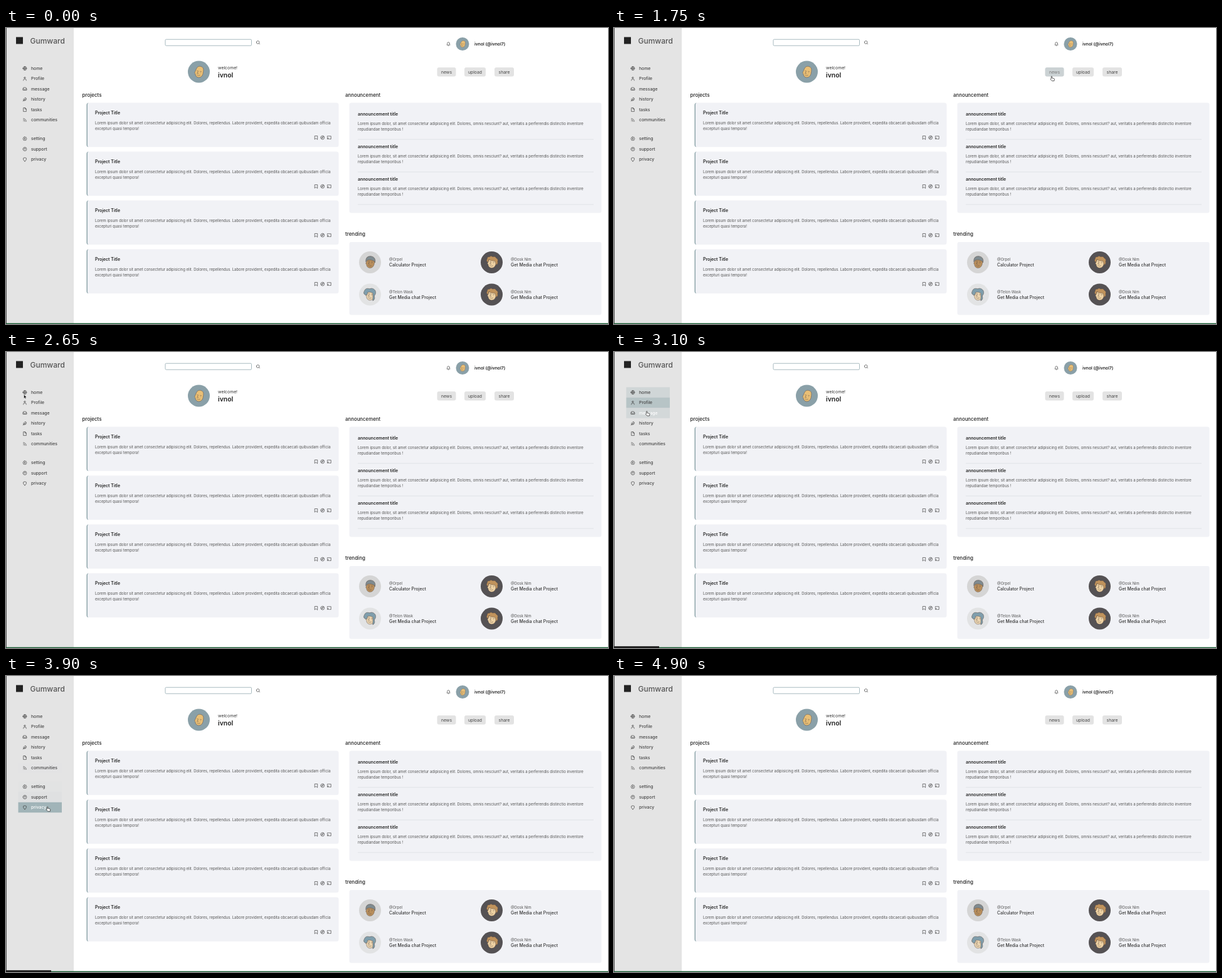
Recreate the animation shown at these times as an HTML page. Size 960 by 473 pixels, loop 5.35 s.

```html
<!DOCTYPE html>
<html lang="en">
<head>
<meta charset="utf-8">
<title>Dashboard</title>
<style>
  html, body { margin: 0; width: 100%; height: 100%; overflow: hidden; background: #fff; }
  svg { display: block; width: 960px; height: 473px; }
  text { font-family: Inter, "Noto Sans", sans-serif; white-space: pre; }
  .icon { fill: none; stroke: #3c3c3c; stroke-width: 2.3; stroke-linecap: round; stroke-linejoin: round; }
  .line { fill: none; stroke: #5a4a42; stroke-width: .45; stroke-linecap: round; stroke-linejoin: round; }
</style>
</head>
<body>
<svg id="stage" viewBox="0 0 960 473"></svg>
<script>
const LOOP = 5350, FADE = 300, ACCENT = '#8fa7ac', CARD = '#f1f2f6';

// Icons on a 24 unit grid
const ICONS = {
  globe: 'M2 12a10 10 0 1 0 20 0a10 10 0 1 0-20 0ZM2 12H22M12 2q-8 10 0 20q8-10 0-20',
  user: 'M20 22v-2a5 5 0 0 0-5-5H9a5 5 0 0 0-5 5v2M8 7a4 4 0 1 0 8 0a4 4 0 1 0-8 0',
  inbox: 'M22 12H16l-2 3h-4l-2-3H2M6 4H18l4 8v7H2v-7Z',
  feather: 'M20 12a6 6 0 0 0-8-8L5 11v8h8ZM16 8L2 22M17 15H9',
  file: 'M13 2H4V22H20V9ZM13 2V9H20',
  rss: 'M4 11a9 9 0 0 1 9 9M4 4a16 16 0 0 1 16 16M5 19h.1',
  gear: 'M12 1l3 3 4-.5.5 4L23 12l-3.5 4-.5 4-4-.5-3 3-3-3-4 .5-.5-4L1 12l3.5-4 .5-4 4 .5ZM9 12a3 3 0 1 0 6 0a3 3 0 1 0-6 0',
  help: 'M2 12a10 10 0 1 0 20 0a10 10 0 1 0-20 0M9 9a3 3 0 0 1 6 1q0 2-3 3M12 17h.1',
  shield: 'M12 22q8-4 8-10V5l-8-3-8 3v7q0 6 8 10Z',
  bookmark: 'M19 22l-7-6-7 6V3H19Z',
  compass: 'M2 12a10 10 0 1 0 20 0a10 10 0 1 0-20 0M16 8l-2 6-6 2 2-6Z',
  cast: 'M2 8V4H22V20H14M2 12a8 8 0 0 1 8 8M2 16a4 4 0 0 1 4 4M2 20h.1',
  search: 'M3 11a8 8 0 1 0 16 0a8 8 0 1 0-16 0M21 21l-4-4',
  bell: 'M18 8A6 6 0 0 0 6 8c0 7-3 9-3 9H21s-3-2-3-9M10 21h4'
};

const rect = (x, y, w, h, fill, rx = 0, more = '') =>
  `<rect x="${x}" y="${y}" width="${w}" height="${h}" rx="${rx}" fill="${fill}" ${more}/>`;
const text = (s, x, y, size, weight = 400, fill = '#555', more = '') =>
  `<text x="${x}" y="${y}" font-size="${size}" font-weight="${weight}" fill="${fill}" ${more}>${s}</text>`;
const icon = (name, x, y, size = 7) =>
  `<path class="icon" d="${ICONS[name]}" transform="translate(${x - size / 2} ${y - size / 2}) scale(${size / 24})"/>`;

// Cartoon heads on a disc of radius 17.5
const HAIR = {
  bald: '',
  short: 'M-7 0Q-9-9 0-10Q8-10 8-1L6-3Q1-5-4-3Z',
  long: 'M-5 2Q-12 2-10-4Q-9-10-2-9Q2-12 7-8Q10-4 7 1Q10 6 6 9L5 2 4-3Q0-5-4-3Z',
  curly: 'M-6 1Q-10-1-8-4Q-9-8-5-8Q-3-11 0-9Q4-11 6-8Q10-7 9-3Q11 0 8 3L6-1Q5-4 2-3Q-2-2-5-4Z'
};
function avatar(x, y, r, bg, skin, style, hair) {
  return `<g transform="translate(${x} ${y}) scale(${r / 17.5})"><circle r="17.5" fill="${bg}"/>
    <g transform="rotate(10)"><path class="line" d="M-5-3Q-4-9 1-9Q7-9 7-2Q8 8 1 9Q-4 9-5 4Q-7 4-6 1Z" style="fill:${skin}"/>
    <path class="line" d="${HAIR[style]}" style="fill:${hair}"/>
    <path class="line" d="M-3-1h2M2-1h2M-1 0L-2.500 3H0M-2 5.500Q0 7 3 5M-2 1h.1M3 1h.1"/></g></g>`;
}

const MENU = [
  ['home', 'globe', 64.5], ['Profile', 'user', 81], ['message', 'inbox', 97.5],
  ['history', 'feather', 114], ['tasks', 'file', 130.5], ['communities', 'rss', 147],
  ['setting', 'gear', 177], ['support', 'help', 193.5], ['privacy', 'shield', 210]
];
const BUTTONS = [['news', 687.5, 30], ['upload', 731, 34], ['share', 779, 31]];

function sidebar() {
  return rect(0, 0, 108, 473, '#e4e4e4') + rect(0, 0, .8, 473, '#333') +
    rect(16, 14.5, 11, 11, '#222') + text('Gumward', 38.5, 24.5, 12, 500) +
    MENU.map(([name, ic, y]) => rect(19.5, y - 8.25, 69.5, 16.5, ACCENT, 0, `id="bg-${name}" opacity="0"`) +
      icon(ic, 30, y) + text(name, 40, y + 2.4, 6.85, 500, '#444', `id="tx-${name}"`)).join('');
}

function header() {
  return rect(254, 18.2, 137.5, 10, '#fff', 1.5, 'stroke="#9db3b8" stroke-width=".9"') +
    icon('search', 402, 23.2) + icon('bell', 705.5, 25.6) +
    avatar(728, 25.5, 10.5, '#8aa0a8', '#e9bf76', 'bald') +
    text('ivnol (@ivnol7)', 747, 28, 6.8, 600, '#222') +
    avatar(307.5, 70, 17.5, '#8aa0a8', '#e9bf76', 'bald') +
    text('welcome!', 338, 65.5, 6.85, 400, '#333') + text('ivnol', 338, 79, 10.4, 600, '#222') +
    BUTTONS.map(([name, x, w]) => rect(x, 63, w, 14.5, '#e3e3e3', 3) +
      rect(x, 63, w, 14.5, ACCENT, 3, `id="bg-${name}" opacity="0"`) +
      text(name, x + w / 2, 72.6, 6.8, 400, '#444', `id="tx-${name}" text-anchor="middle"`)).join('');
}

function projects() {
  let out = text('projects', 121.5, 109.5, 8, 500, '#222');
  for (let i = 0; i < 4; i++) {
    const y = 119.5 + i * 78;
    out += rect(128.5, y, 402, 70.8, CARD, 3.5) +
      `<path fill="${ACCENT}" d="M132 ${y}q-3.5 0-3.5 3.5v63.8q0 3.5 3.5 3.5q-2 0-2-3.5v-63.8q0-3.5 2-3.5Z"/>` +
      text('Project Title', 142, y + 18.8, 6.9, 600, '#222') +
      text('Lorem ipsum dolor sit amet consectetur adipisicing elit. Dolores, repellendus. Labore provident, expedita obcaecati quibusdam officia', 142, y + 34, 5.97) +
      text('excepturi quasi tempora!', 142, y + 43, 5.97) +
      ['bookmark', 'compass', 'cast'].map((n, k) => icon(n, 494.3 + k * 10.5, y + 55.6)).join('');
  }
  return out;
}

function announcements() {
  let out = text('announcement', 541, 109.5, 7.85, 500, '#222') + rect(547.5, 119.5, 402, 176, CARD, 3);
  for (let i = 0; i < 3; i++) {
    const y = 140.4 + i * 52;
    out += text('announcement title', 561, y, 6.87, 600, '#222') +
      text('Lorem ipsum dolor, sit amet consectetur adipisicing elit. Dolores, omnis nesciunt? aut, veritatis a perferendis distinctio inventore', 561, y + 14.9, 5.97) +
      text('repudiandae temporibus !', 561, y + 23.8, 5.97) +
      rect(561, y + 37.2, 376, .8, '#d9dce1');
  }
  return out;
}

function trending() {
  const chat = 'Get Media chat Project', dark = ['#555254', '#efd3a4', 'curly', '#c0935c'];
  const people = [
    [580.5, 374.5, '@Orpel', 'Calculator Project', ['#d5d5d5', '#b98f5c', 'short', '#7f8b90']],
    [774.5, 374.5, '@Dosk Nim', chat, dark],
    [580.5, 426, '@Telon Wask', chat, ['#e2e3e4', '#ecd6b2', 'long', '#7f9eac']],
    [774.5, 426, '@Dosk Nim', chat, dark]
  ];
  return text('trending', 541, 332.3, 8, 500, '#222') + rect(547.5, 342, 402, 116.5, CARD, 3) +
    people.map(([x, y, who, what, look]) => avatar(x, y, 17.5, ...look) +
      text(who, x + 30.5, y - 2.5, 5.95) + text(what, x + 30.5, y + 6.8, 6.92, 500, '#333')).join('');
}

document.getElementById('stage').innerHTML =
  sidebar() + header() + projects() + announcements() + trending() +
  rect(0, 471.7, 960, 1.3, '#145a30') + rect(0, 470.2, 72, 2.8, '#1c1c1c', 0, 'id="status" opacity="0"') +
  `<g id="cursor">
    <path id="arrow" d="M0 0V6.2L1.4 4.9 2.3 7 3.3 6.5 2.4 4.5H4.4Z" fill="#111" stroke="#fff" stroke-width=".4"/>
    <path id="hand" transform="translate(-2.3 0)" d="M1.6 4.2V.9a.7.7 0 0 1 1.4 0V3l3 .7q1 .3.9 1.4L6.4 7.6H2.8L.6 5.2q0-1 1-1Z" fill="#fff" stroke="#222" stroke-width=".7"/>
  </g>`;

// Pointer path: time, x, y
const PATH = [
  [100, 420, 90], [250, 300, 22], [350, 300, 22], [600, 21, 18], [900, 455, 24], [1150, 707, 28.5],
  [1400, 707, 29], [1550, 704, 50], [1750, 697.5, 77], [1900, 748, 73], [2050, 796, 72], [2150, 780, 75],
  [2450, 10, 62], [2550, 8, 60], [2650, 28.5, 68], [2900, 45, 68], [3000, 50, 82], [3130, 53, 98],
  [3300, 54, 114], [3500, 55, 129.5], [3600, 57, 140], [3700, 60, 178], [3900, 66, 208.5],
  [3980, 80, 220], [4100, 475, 368], [4200, 620, 474]
];
// Time the pointer spends over each target
const HOVERS = {
  logo: [550, 650], bell: [1100, 1470], news: [1705, 1820], upload: [1860, 1970], share: [2000, 2150],
  home: [2690, 2950], Profile: [2950, 3070], message: [3070, 3190], history: [3190, 3400],
  tasks: [3400, 3580], communities: [3580, 3640], setting: [3660, 3690], support: [3690, 3740],
  privacy: [3740, 3985]
};

const $ = id => document.getElementById(id);
const ease = p => { p = Math.min(1, Math.max(0, p)); return 1 - (1 - p) ** 2; };
const level = (t, [a, b]) => ease((Math.min(t, b) - a) / FADE) * (1 - ease((t - b) / FADE));

function pointer(t) {
  const i = PATH.findIndex(p => p[0] > t);
  if (i < 1) return null;
  const [a, b] = [PATH[i - 1], PATH[i]], k = (t - a[0]) / (b[0] - a[0]);
  return [a[1] + (b[1] - a[1]) * k, a[2] + (b[2] - a[2]) * k];
}

function draw(t) {
  let over = false;
  for (const [name, span] of Object.entries(HOVERS)) {
    const on = t >= span[0] && t < span[1], bg = $('bg-' + name);
    over = over || on;
    if (!bg) continue;
    const l = level(t, span), g = Math.round(68 + 187 * l);
    bg.setAttribute('opacity', l);
    $('tx-' + name).setAttribute('fill', MENU.some(m => m[0] === name)
      ? (on ? '#fff' : '#444') : `rgb(${g},${g},${g})`);
  }
  const p = pointer(t);
  $('cursor').setAttribute('visibility', p ? 'visible' : 'hidden');
  if (p) $('cursor').setAttribute('transform', `translate(${p})`);
  $('arrow').setAttribute('opacity', over ? 0 : 1);
  $('hand').setAttribute('opacity', over ? 1 : 0);
  $('status').setAttribute('opacity', ease((t - 2750) / 150) * (1 - ease((t - 4150) / 300)));
}

const start = performance.now();
function tick() {
  draw((performance.now() - start) % LOOP);
  requestAnimationFrame(tick);
}
tick();
</script>
</body>
</html>
```
